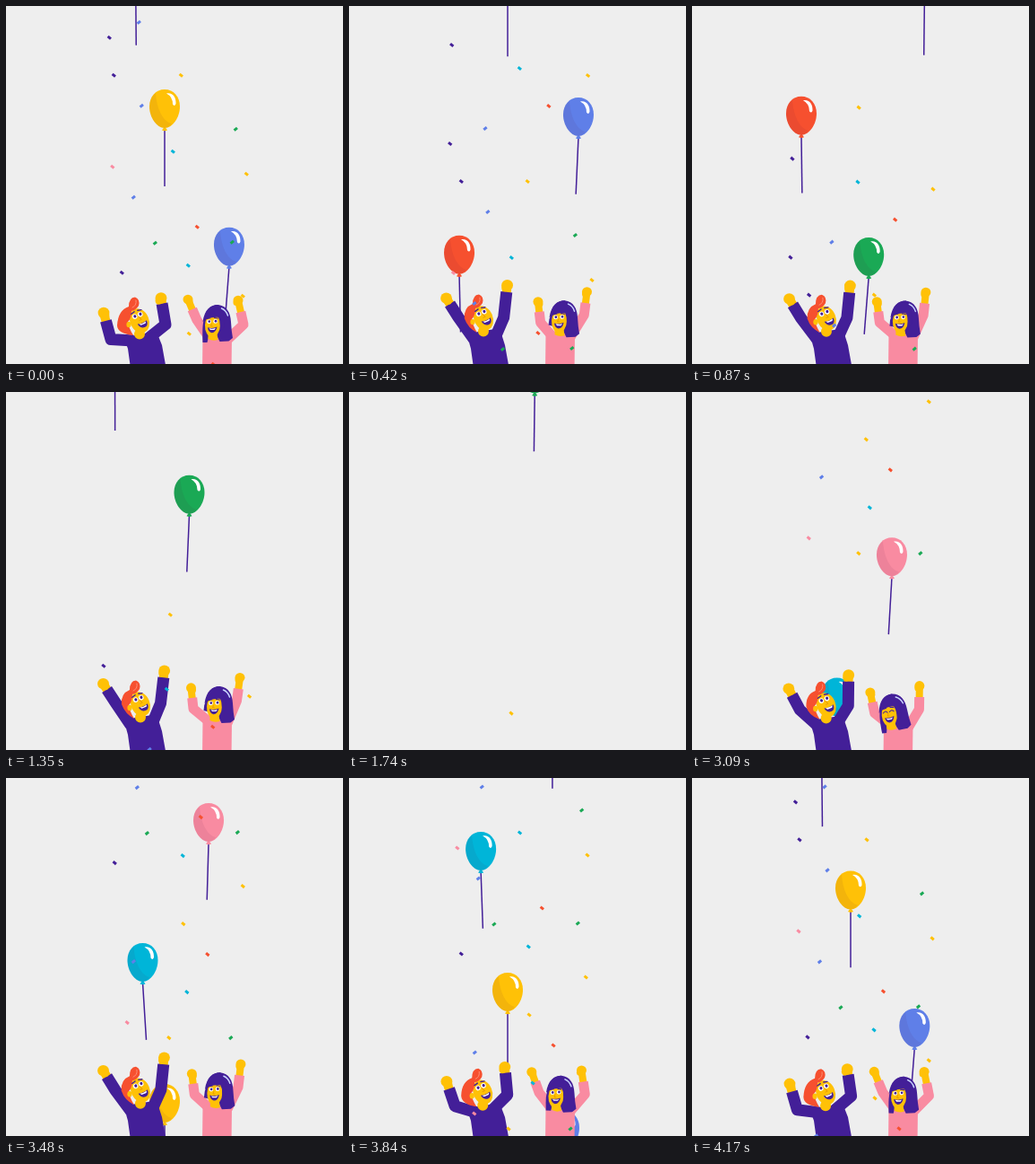
Animation, 376 px wide and 399 px high, one loop 4.2 s. Source, as an HTML page with a canvas:

```html
<!DOCTYPE html>
<html lang="en">
<head>
<meta charset="utf-8">
<title>Celebration</title>
<style>
html, body { margin: 0; width: 100%; height: 100%; overflow: hidden; background: #eee; }
canvas { display: block; }
</style>
</head>
<body>
<canvas id="stage"></canvas>
<script>
const W = 376, H = 399, LOOP = 4200, START = 2200;
const canvas = document.getElementById('stage');
const ctx = canvas.getContext('2d');
const ratio = window.devicePixelRatio || 1;
canvas.width = W * ratio;
canvas.height = H * ratio;
canvas.style.width = W + 'px';
canvas.style.height = H + 'px';

const C = {
  pink: '#f98ba1', teal: '#00b5d8', yellow: '#ffc107', blue: '#5f7fe8',
  red: '#f6502f', green: '#1aa955', purple: '#431f98', white: '#fff'
};

const lerp = (a, b, k) => a + (b - a) * k;
const mix = (p, q, k) => [lerp(p[0], q[0], k), lerp(p[1], q[1], k)];
const clamp = (v, low = 0) => Math.min(1, Math.max(low, v));
const smooth = v => v * v * (3 - 2 * v);

// Eased value of a list of [time, value] keys
function track(keys, t) {
  const i = keys.findIndex(key => key[0] > t);
  if (i < 0) return keys[keys.length - 1][1];
  if (i === 0) return keys[0][1];
  const [t0, a] = keys[i - 1], [t1, b] = keys[i];
  return lerp(a, b, smooth((t - t0) / (t1 - t0)));
}

function fill(d, color) {
  ctx.fillStyle = color;
  ctx.fill(new Path2D(d));
}

function line(d, color, width, cap = 'round') {
  ctx.strokeStyle = color;
  ctx.lineWidth = width;
  ctx.lineCap = cap;
  ctx.lineJoin = 'round';
  ctx.stroke(new Path2D(d));
}

function oval(x, y, rx, ry, color, turn = 0) {
  ctx.fillStyle = color;
  ctx.beginPath();
  ctx.ellipse(x, y, rx, ry, turn, 0, 7);
  ctx.fill();
}

function at(x, y, turn, draw) {
  ctx.save();
  ctx.translate(x, y);
  ctx.rotate(turn);
  draw();
  ctx.restore();
}

// Balloons: colour, release time, starting x, sideways drift
const balloons = [
  ['pink', 2404, 212.5, 14.5], ['teal', 2857, 168.9, -24.3], ['yellow', 3313, 177, 0],
  ['blue', 3759, 237.6, 22], ['red', 4205, 124.5, -3], ['green', 4662, 187.5, 20]
];

function drawBalloon([color, release, x, drift], t) {
  const age = t - release;
  const y = H - 0.3445 * age;
  if (age < 0 || y < -112) return;
  const u = Math.min(1, age / 1450);
  const trail = -7 * (1 - u) * clamp(drift / 10, -1);
  at(x + drift * (2 * u - u * u), y, 0, () => {
    line(`M0 44L${trail} 107.8`, C.purple, 1.5, 'butt');
    fill('M0 41L3 45.5Q0 47 -3 45.5Z', C[color]);
    fill('M0 0C10 0 17 8 17 19C17 31 9 43 0 43C-9 43 -17 31 -17 19C-17 8 -10 0 0 0Z', C[color]);
    fill('M-10 4C-9 21 -2 36 8 38Q4 43 0 43C-9 43 -17 31 -17 19Q-17 9 -10 4Z', 'rgba(90,20,60,.07)');
    fill('M2 4.5C9 3 13 9 12.5 16Q11 19.5 9 16.5Q9 8 2 4.5Z', C.white);
  });
}

// Confetti: colour, x and y at the loop seam, sideways drift per 100px of fall
const confetti = [
  ['yellow', 174, 492, -3.7], ['green', 243, 492, -3.7], ['pink', 144, 475, 4.5],
  ['teal', 208, 441, 3.2], ['blue', 138, 407, -2], ['red', 231, 399, 3.2],
  ['yellow', 204, 365, 3.2], ['yellow', 264, 323, 0], ['purple', 129, 297, 4],
  ['teal', 203, 289, 3], ['green', 252, 263, -3], ['green', 166, 264, 4.4],
  ['red', 213, 246, -2], ['blue', 142, 213, -2], ['yellow', 268, 187, 2.3],
  ['pink', 118.5, 179, -2], ['teal', 186, 162, -4.2], ['green', 256, 137, -3.3],
  ['blue', 151, 111, 3], ['yellow', 195, 77, 3.3], ['purple', 120, 77, 4.2],
  ['purple', 115, 35, -2.2], ['blue', 148, 18, 3.1], ['red', 219, -7, 3],
  ['yellow', 264, -41, 1.9], ['teal', 195, -49, -4.2], ['purple', 117, -75, -2.2],
  ['yellow', 191, -132, -2.1]
];

function drawPiece([color, x, y, drift], t) {
  const fall = 0.2815 * (t - LOOP);
  const tilt = color === 'blue' || color === 'green' ? -0.7 : 0.7;
  at(x + 0.3 + drift * fall / 100, y + fall, tilt, () => {
    ctx.fillStyle = C[color];
    ctx.fillRect(-2.2, -1.5, 4.4, 3);
  });
}

function arm(hand, elbow, shoulder, color, width, cuff) {
  const wrist = mix(hand, elbow, cuff);
  line(`M${hand}L${wrist}`, C.yellow, width - 3);
  line(`M${wrist}L${elbow}L${shoulder}`, color, width, 'butt');
}

function fist([x, y], r, side) {
  oval(x, y, r, r * 0.97, C.yellow);
  oval(x + side * r * 0.4, y + r * 0.45, r * 0.6, r * 0.65, C.yellow);
}

function eye(x, y, r, open) {
  if (open < 0.25) {
    line(`M${x - r} ${y + 1}Q${x} ${y - 2} ${x + r} ${y + 1}`, C.purple, 1);
    return;
  }
  oval(x, y, r, r * open, C.white);
  oval(x + 0.3, y - 0.2, r * 0.55, r * 0.6 * open, C.purple);
}

function drawMan(k, lean) {
  const shift = -1.2 * Math.max(0, lean);
  const leftHand = mix([108.5 + shift, 325.2], [109, 342], k);
  const rightHand = mix([176.7 + shift, 310.7], [173, 325.5], k);
  arm(leftHand, mix([122, 346], [117, 371.5], k), mix([139, 371], [142, 373], k), C.purple, 13, 0.3);
  arm(rightHand, mix([172.5, 347], [178, 355], k), mix([163, 370], [158, 371], k), C.purple, 13, 0.21);
  const s = 4 * k;
  fill(`M131 ${364 + s}L146 ${363 + s}L168 ${359 + s}L174 378L178 400H138.5L136 382Z`, C.purple);
  fist(leftHand, 6.4, 1);
  fist(rightHand, 6.4, -1);
  at(148 - k, 347 + 3 * k, 0, () => {
    oval(2, 15.5, 6, 6, C.yellow);
    at(0, 0, -0.4, () => oval(1.5, 1.5, 10.5, 14, C.yellow));
    fill(`M-5 17Q${-15 - 8 * k} ${12 + 3 * k} ${-19 - 4 * k} ${1 + 5 * k}`
      + `Q${-20 - 2 * k} -11 -10 -15Q-10 -25 -3 -25.5Q3 -23 1 -16Q-2 -11 -7 -10Q-7 -2 -11 2Q-10 9 -5 17Z`, C.red);
    line('M-6 -14Q-1 -16 -2 -22', '#ff8a70', 1);
    oval(-10, 5, 2.6, 3.2, C.yellow);
    at(0, 0, -0.4, () => {
      line('M-4 -9L0 -10M4 -10L8 -9', C.purple, 1.4);
      eye(-1.6, -4.8, 2.8, 1);
      eye(5, -4.8, 2.8, 1);
      line('M2.5 -3L4 1L1.5 1', '#e89a00', 0.9);
      fill('M-2 4Q3.5 6 9 4Q9 10.5 4 10.5Q-1 10 -2 4Z', C.purple);
      fill('M-0.5 4.8Q3.5 6 7.8 4.8L6.5 6.8H1Z', C.white);
    });
  });
}

function drawWoman(k, lean) {
  const down = Math.max(0, lean);
  const sway = -6.5 * lean, drop = 6 * down;
  const hands = p => [p[0] + sway, p[1] + drop];
  const body = p => [p[0] - 5.5 * down, p[1] + drop * 0.6];
  const leftHand = hands(mix([206.5, 329.7], [203, 327], k));
  const rightHand = hands(mix([261, 318.3], [259, 328], k));
  arm(leftHand, hands(mix([209, 353], [213, 350], k)), body([226, 367 + 2 * k]), C.pink, 11, 0.48);
  arm(rightHand, hands(mix([257.5, 344], [265, 355], k)), body([247, 369 + 3 * k]), C.pink, 11, 0.48);
  at(-5.5 * down, drop * 0.4, 0, () =>
    fill('M219.5 366Q224 360 236 364Q248 362 252 367L251.5 408H219Z', C.pink));
  fist(leftHand, 5.5, 1);
  fist(rightHand, 5.5, -1);
  const headX = 236.5 - 2 * k - 12 * down + 3 * (down - lean);
  at(headX, 349 + 5 * k + 7 * down, -0.15 * down, () => {
    const s = Math.max(clamp(k), down);
    fill('M-14 -2C-13 -15 -6 -21 2 -21C12 -20 16 -12 16.5 -2Q17 8 18.5 16L14 19.5L4 20L-3 6Z', C.purple);
    fill(`M-13 -6L-3 -9L-7 8L${-9 - s} ${8 + 13 * s}L${-16 + s} ${6 + 15 * s}Q-16 0 -13 -6Z`, C.purple);
    fill('M-9 5H0L2 18Q-4 20 -9 17Z', C.yellow);
    oval(-4, 2, 8.5, 13, C.yellow, 0.05);
    fill('M-15 -2C-13 -16 -6 -21 2 -21Q10 -17 9 4L4.5 9L4 -7Q-5 -8 -13 -4Z', C.purple);
    line('M6 -17Q11 -15 13 -9', '#c9d4ff', 1.5);
    line('M-10.5 -5.5L-6.5 -6.3M-2 -6.5L2 -6', C.purple, 1.1);
    const open = 1 - down;
    eye(-8, -2.2, 2.4, open);
    eye(-0.8, -2.6, 2.4, open);
    line('M-5 0L-6 3L-4 3', '#e89a00', 0.9);
    fill('M-9.5 4.3Q-4 6 1 3.6Q0 10 -5 10.3Q-9 9.5 -9.5 4.3Z', C.purple);
    fill('M-8 5.2Q-4 6.3 -0.5 4.8L-2 7H-6.5Z', C.white);
  });
}

// How far the arms are pulled down, and how far the woman leans left
const pump = [
  [2700, 0], [2960, 0.9], [3060, 0.35], [3120, 0.3], [3240, 1.4], [3480, 0.06],
  [3737, 1.4], [3960, 0], [4170, 0.93], [4200, 1], [4270, 1.4], [4620, 0.03],
  [4790, 1.4], [5035, 0], [5290, 1.4], [5540, 0]
];
const leaning = [[2900, 0.4], [3090, 1], [3400, -0.2], [3700, 0], [4200, 0], [4620, -0.7], [5100, 0]];

function frame(now) {
  let t = now % LOOP;
  if (t < START) t += LOOP;
  ctx.setTransform(ratio, 0, 0, ratio, 0, 0);
  ctx.fillStyle = '#eee';
  ctx.fillRect(0, 0, W, H);
  balloons.forEach(b => drawBalloon(b, t));

  const rise = 1 - Math.pow(1 - clamp((t - 2500) / 430), 3);
  const leave = Math.pow(clamp((t - 5560) / 230), 2);
  const hidden = 110 * (1 - rise + leave);
  if (hidden < 105) {
    const k = track(pump, t), lean = track(leaning, t);
    at(0, hidden, 0, () => {
      drawMan(k, lean);
      drawWoman(k, lean);
    });
  }
  confetti.forEach(p => drawPiece(p, t));
}

const begin = performance.now();
function tick() {
  frame(performance.now() - begin);
  requestAnimationFrame(tick);
}
tick();
</script>
</body>
</html>
```
